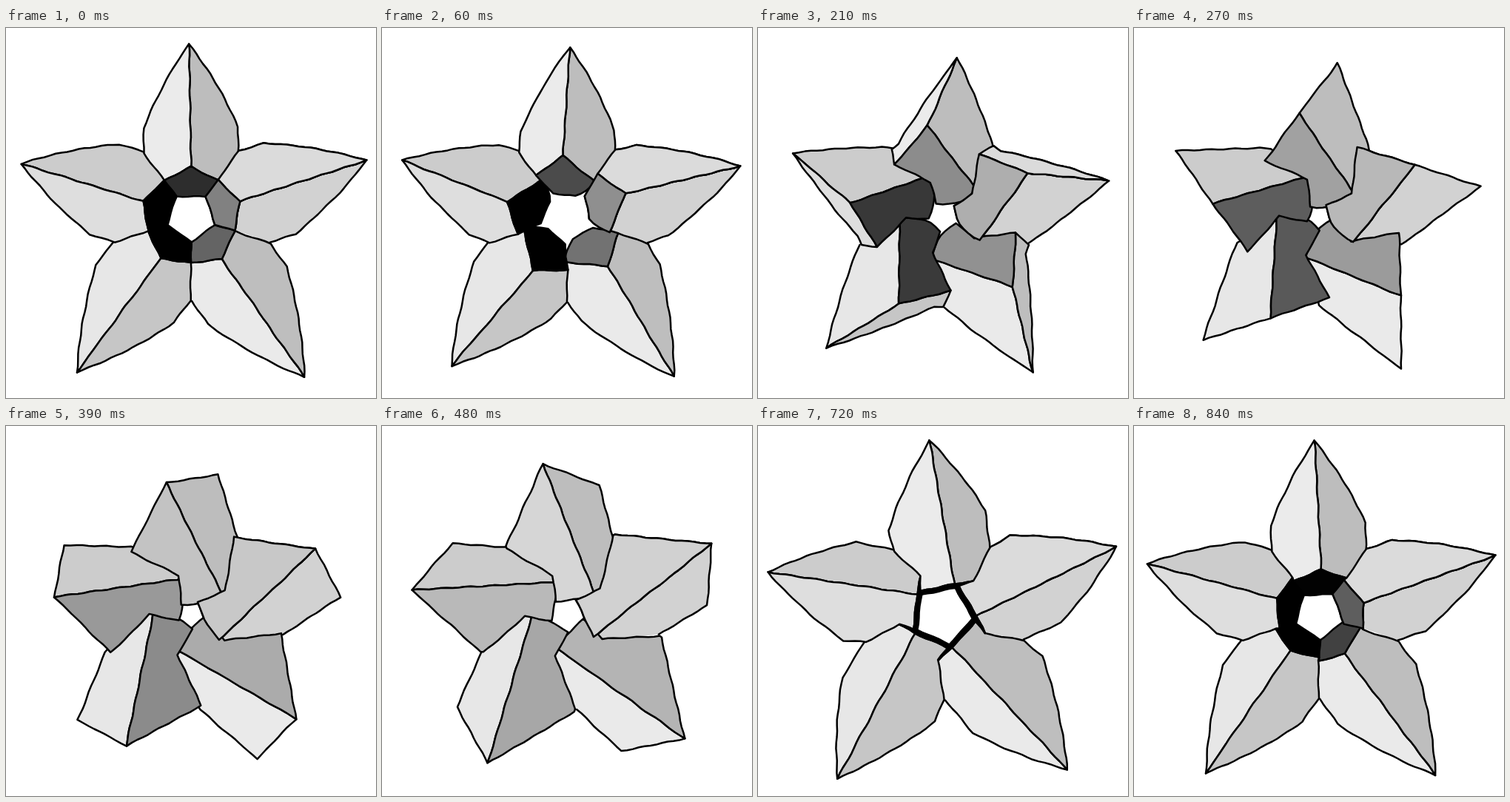
Write an HTML page that moves like this. It is 500 px wide and 500 px high and loops after 870 ms.

```html
<!DOCTYPE html>
<html>
<head>
<meta charset="utf-8">
<style>
html, body { margin: 0; width: 100%; height: 100%; overflow: hidden; background: #fff; }
svg { display: block; width: 100%; height: 100%; }
path { stroke: #000; stroke-width: 2.5; stroke-linejoin: round; stroke-linecap: round; }
</style>
</head>
<body>
<svg id="stage" viewBox="0 0 500 500"></svg>
<script>
const LOOP = 870, STEP = 30, FLIP = 270, OPEN = 480;
const FIFTH = 72, RAD = Math.PI / 180;

// Each path holds [radius, angle] inside one petal, four points per loop.
const KEYS = [0, 240, 390, 660];

// A corner of the ring takes a new role every loop, and returns after five:
// inner right, ridge end, tip, right shoulder, right seam.
const ring = {
  closed: true,
  points: [
    [65, 50], [62, 42.5], [61.5, 36], [57, 54],
    [46, 58], [45, 20], [69, 0], [148, -10.5],
    [219, -8.3], [252.5, -3.6], [250, 0], [221.5, 7.2],
    [189, 14.1], [158, 21.9], [141.7, 27.3], [126, 31],
    [125, 30.3], [112, 35], [110.5, 36], [115.6, 36.4]
  ]
};
// From the hole to inner left, then to the left shoulder.
const rim = {
  points: [
    [40, 24], [40, 24], [34, 36], [18, -40],
    [23, -40], [45, -44], [61.5, -36], [108, -43.5],
    [128, -41], [141, -32], [141, -27.3], [115, -31.5]
  ]
};
// From the hole to the left notch.
const notch = {
  points: [
    [40, -47], [40, -47], [34, -36], [54, -17],
    [57, -20], [61, -30], [61.5, -36]
  ]
};

// Clockwise from the top: shade of the steady face, then the turning face's
// final shade and how much darker it starts.
const petals = [
  { side: 189, end: 235, dark: 190 },
  { side: 210, end: 219, dark: 90 },
  { side: 234, end: 190, dark: 90 },
  { side: 231, end: 198, dark: 280 },
  { side: 204, end: 222, dark: 330 }
];

const clamp = v => Math.max(0, Math.min(1, v));
const keyTime = j => LOOP * Math.floor(j / 4) + KEYS[(j % 4 + 4) % 4];

// Smooth curve through a path's points; role counts the loops already passed.
function along({ points, closed }, role, u) {
  const t = u - OPEN + LOOP * role, n = points.length;
  const at = j => points[closed ? (j + n) % n : Math.max(0, Math.min(n - 1, j))];
  let j = -1;
  while (t >= keyTime(j + 1)) j++;
  const span = keyTime(j + 1) - keyTime(j);
  const f = (t - keyTime(j)) / span, g = 1 - f;
  const slope = (k, d) => (at(k + 1)[d] - at(k - 1)[d]) /
    (keyTime(k + 1) - keyTime(k - 1)) * span;
  return [0, 1].map(d =>
    g * g * (1 + 2 * f) * at(j)[d] + f * f * (3 - 2 * f) * at(j + 1)[d] +
    f * g * g * slope(j, d) - f * f * g * slope(j + 1, d));
}

function cornersAt(u) {
  const [innerRight, ridge, tip, shoulder, seam] =
    [0, 1, 2, 3, 4].map(role => along(ring, role, u));
  return {
    innerRight, ridge, tip, shoulder, seam,
    holeRight: along(rim, 0, u),
    innerLeft: along(rim, 1, u),
    leftShoulder: along(rim, 2, u),
    holeLeft: along(notch, 0, u),
    leftNotch: along(notch, 1, u),
    leftSeam: [seam[0], seam[1] - FIFTH]
  };
}

// Petal to stage, with the slight lopsidedness of a freehand drawing.
function place([r, angle], k) {
  const dir = k * FIFTH, far = r / 250;
  const size = r * (1 + 0.035 * far * Math.cos((dir - 160) * RAD));
  const a = (dir + angle - 1.7 * far * Math.cos((dir - 55) * RAD)) * RAD;
  return [250 + 1.5 * far + size * Math.sin(a),
    255 + 8 * far * far - size * Math.cos(a)];
}

const wobble = (x, y) =>
  (x + 0.6 * Math.sin(y * 0.17 + x * 0.06)).toFixed(1) + ' ' +
  (y + 0.6 * Math.sin(x * 0.18 - y * 0.05 + 1)).toFixed(1);

// Outline through points; bulge[i] bows the edge after point i.
function outline(points, bulge, closed) {
  const out = [], n = points.length;
  for (let i = 0; i < n - (closed ? 0 : 1); i++) {
    const [x, y] = points[i], [x2, y2] = points[(i + 1) % n];
    const dx = x2 - x, dy = y2 - y;
    const parts = Math.max(1, Math.round(Math.hypot(dx, dy) / 8));
    for (let s = 0; s <= parts; s++) {
      const f = s / parts, h = 4 * f * (1 - f) * (bulge[i] || 0);
      out.push(wobble(x + dx * f + dy * h, y + dy * f - dx * h));
    }
  }
  return 'M' + out.join('L') + (closed ? 'Z' : '');
}

// The turning face brightens towards its final shade.
function turningShade({ end, dark }, t) {
  const left = clamp(1 - Math.max(t, -LOOP) / 720 + (t < 0 ? 0 : 0));
  const rest = t < 0 ? (1 - t / 720) ** 2 : left * left;
  return Math.max(0, end - dark * rest + 0.9 * Math.min(0, t));
}

const stage = document.getElementById('stage');
function addPath() {
  const el = document.createElementNS('http://www.w3.org/2000/svg', 'path');
  stage.append(el);
  return el;
}
function put(el, d, shade) {
  const v = Math.round(shade);
  el.setAttribute('d', d);
  el.setAttribute('fill', `rgb(${v},${v},${v})`);
}

// Each petal overlaps the next one clockwise, all the way round, so the
// first one drawn gets its turning faces again on top.
const order = [1, 2, 3, 4, 0];
for (const k of order) petals[k].paths = [addPath(), addPath(), addPath()];
const cover = [addPath(), addPath()];

function draw(ms) {
  const t = Math.floor(ms % LOOP / STEP) * STEP;
  const u = t < FLIP ? t + LOOP : t;
  const c = cornersAt(u);
  const fold = 0.15 * clamp((OPEN - u) / 210);
  const inner = 0.15 * clamp((u - LOOP) / 150);
  const bow = 0.03 * clamp((u - OPEN) / 120) * clamp((1140 - u) / 120);
  const sideFace = [c.innerRight, c.ridge, c.tip, c.shoulder, c.seam];
  const turnFace = [c.leftShoulder, c.tip, c.ridge, c.innerLeft];
  if (u < LOOP) turnFace.push(c.leftNotch);
  if (u >= OPEN) turnFace.push(c.leftSeam);
  const core = [c.innerLeft, c.ridge, c.innerRight, c.holeRight, c.holeLeft];

  for (const k of order) {
    const petal = petals[k], [side, turn, mid] = petal.paths;
    const on = list => list.map(p => place(p, k));
    put(side, outline(on(sideFace), [0, 0, bow], u < OPEN), petal.side);
    put(turn, outline(on(turnFace), [bow, 0, fold], true), turningShade(petal, u));
    put(mid, u < 700 ? '' : outline(on(core), [0, 0, inner], true),
      turningShade(petal, u - LOOP));
  }
  cover.forEach((el, i) => {
    const from = petals[order[0]].paths[i + 1];
    el.setAttribute('d', from.getAttribute('d'));
    el.setAttribute('fill', from.getAttribute('fill'));
  });
}

const start = performance.now();
function tick() {
  draw(performance.now() - start);
  requestAnimationFrame(tick);
}
tick();
</script>
</body>
</html>
```
